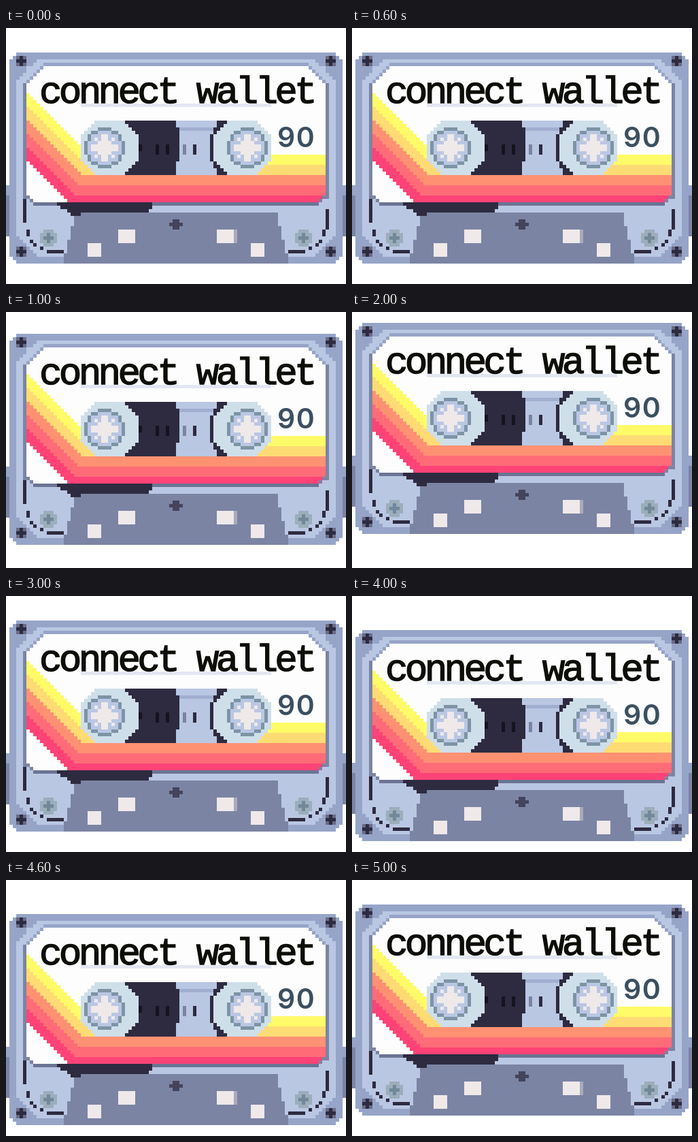
These frames come from a looping animation (500x376 px, 6000 ms). An HTML page with a canvas:

```html
<!DOCTYPE html>
<html lang="en">
<head>
<meta charset="utf-8">
<style>
  html, body { margin: 0; width: 100%; height: 100%; overflow: hidden; background: #fff; }
  #tape { position: absolute; left: 0; top: 36px; width: 500px; height: 310px; }
  canvas { width: 500px; height: 310px; image-rendering: pixelated; display: block; }
  svg { position: absolute; left: 0; top: 0; }
  .title {
    font: 56px "Liberation Mono", monospace; letter-spacing: -4.75px;
    fill: #0d0d08; stroke: #0d0d08; stroke-width: 1.4px;
  }
  .minutes { font: 600 41px Inter, sans-serif; letter-spacing: 1.5px; fill: #3b4f60; }
</style>
</head>
<body>
<div id="tape">
  <canvas width="100" height="62"></canvas>
  <svg width="500" height="310">
    <text class="title" x="49" y="74">connect wallet</text>
    <text class="minutes" x="399" y="139">90</text>
  </svg>
</div>
<script>
const tape = document.getElementById('tape');
const ctx = document.querySelector('canvas').getContext('2d');
const MID = '#96a4c8', LIGHT = '#bac7e3', SHADE = '#7b84a3';
const INK = '#2e2b40', ICE = '#cfdfea', RING = '#7d94a6', CREAM = '#efe9ea', WHITE = '#fdfdfd';

// One canvas pixel is a 5 px cell of the artwork.
function box(color, x, y, w, h) {
  ctx.fillStyle = color;
  ctx.fillRect(x, y, w, h);
}

function pair(color, x, y, w, h) {
  box(color, x, y, w, h);
  box(color, 100 - x - w, y, w, h);
}

function disc(color, cx, cy, rx, ry = rx) {
  for (let y = Math.floor(cy - ry); y < cy + ry; y++)
    for (let x = Math.floor(cx - rx); x < cx + rx; x++)
      if (((x + .5 - cx) / rx) ** 2 + ((y + .5 - cy) / ry) ** 2 <= 1) box(color, x, y, 1, 1);
}

function drawShell() {
  pair(MID, 0, 39, 1, 3);
  pair(SHADE, 0, 42, 1, 12);
  box(MID, 1, 2, 98, 58);
  box(MID, 2, 1, 96, 60);
  box(MID, 3, 0, 94, 62);
  box(LIGHT, 3, 2, 94, 58);
  for (let i = 0; i < 6; i++) {
    pair(MID, 3, 2 + i, 6 - i, 1);
    pair(MID, 3, 59 - i, 6 - i, 1);
  }
  box(MID, 11, 3, 78, 1);
  pair(SHADE, 5, 9, 1, 34);
}

function drawLabel() {
  box(WHITE, 6, 4, 88, 39);
  box(WHITE, 8, 43, 84, 1);
  const colors = ['#fffb68', '#ffdb74', '#ff9173', '#ff6c78', '#ff4377'];
  for (let x = 6; x < 94; x++) {
    const edge = i => Math.min(12 + 4 * i + x - 6, 30 + 3 * i, 44);
    colors.forEach((color, i) => box(color, x, edge(i), 1, edge(i + 1) - edge(i)));
  }
  for (let i = 0; i < 5; i++) {
    pair(LIGHT, 6, 4 + i, 5 - i, 1);
    pair(MID, 10 - i, 4 + i, 1, 1);
  }
  pair(LIGHT, 6, 42, 1, 2);
  pair(SHADE, 6, 42, 1, 1);
  pair(SHADE, 7, 43, 1, 1);
  box('#6b7493', 8, 44, 84, 1);
  box('#e2e7f1', 22, 15, 56, 1);
}

function drawHub(cx) {
  disc(RING, cx, 28, 6);
  disc(LIGHT, cx, 28, 5);
  box(CREAM, cx - 1, 24, 2, 8);
  box(CREAM, cx - 4, 27, 8, 2);
  disc(CREAM, cx, 28, 2.3);
  for (const x of [cx - 3, cx + 2])
    for (const y of [25, 30]) box(CREAM, x, y, 1, 1);
}

function drawWindow() {
  box(LIGHT, 50, 20, 18, 16);
  box('#a2aed0', 50, 22, 12, 1);
  box(INK, 30, 20, 20, 16);
  box(INK, 50, 22, 1, 10);
  box(INK, 60, 24, 5, 8);
  box(INK, 61, 22, 5, 12);
  box(INK, 62, 20, 5, 16);
  disc(ICE, 30.5, 28, 9, 8.49);
  disc(ICE, 69.5, 28, 9, 8.49);
  box('#15131f', 39, 27, 1, 2);
  for (const x of [44, 47]) box('#15131f', x, 27, 1, 3);
  box(SHADE, 52, 27, 1, 3);
  box(INK, 55, 27, 1, 3);
  drawHub(29);
  drawHub(71);
}

function drawBase() {
  for (let y = 47; y < 62; y++) {
    const x = 20 - Math.floor((y - 47) / 3.7);
    pair(SHADE, x, y, 50 - x, 1);
  }
  box(INK, 15, 44, 28, 1);
  box(INK, 16, 45, 27, 1);
  box(INK, 18, 46, 24, 1);
  box(INK, 19, 47, 3, 1);
  pair(CREAM, 33, 52, 5, 4);
  pair(CREAM, 24, 56, 4, 4);
  box('#a9abbc', 67, 52, 1, 4);
  box('#44445c', 49, 49, 2, 3);
  box('#44445c', 48, 50, 4, 1);

  box(INK, 5, 43, 1, 7);
  box(INK, 94, 46, 1, 6);
  pair(INK, 6, 52, 1, 2);
  pair(INK, 7, 55, 1, 1);
  pair(INK, 8, 56, 1, 1);
  pair(INK, 10, 57, 1, 1);
  pair(INK, 12, 58, 5, 1);
  for (const cx of [12.5, 87.5]) {
    disc('#9cadbb', cx, 54.5, 2.6);
    disc('#71899a', cx, 54.5, 1.2);
  }
}

function drawScrews() {
  for (const y of [1, 57]) {
    pair('#696b86', 3, y, 3, 3);
    pair(INK, 4, y, 1, 3);
    pair(INK, 3, y + 1, 3, 1);
  }
}

drawShell();
drawLabel();
drawWindow();
drawBase();
drawScrews();

// The cassette jumps to a new height every second.
const heights = [0, -4, -20, 0, 14, 0];
function play() {
  const step = Math.floor(performance.now() / 1000) % heights.length;
  tape.style.transform = `translateY(${heights[step]}px)`;
  requestAnimationFrame(play);
}
play();
</script>
</body>
</html>
```
